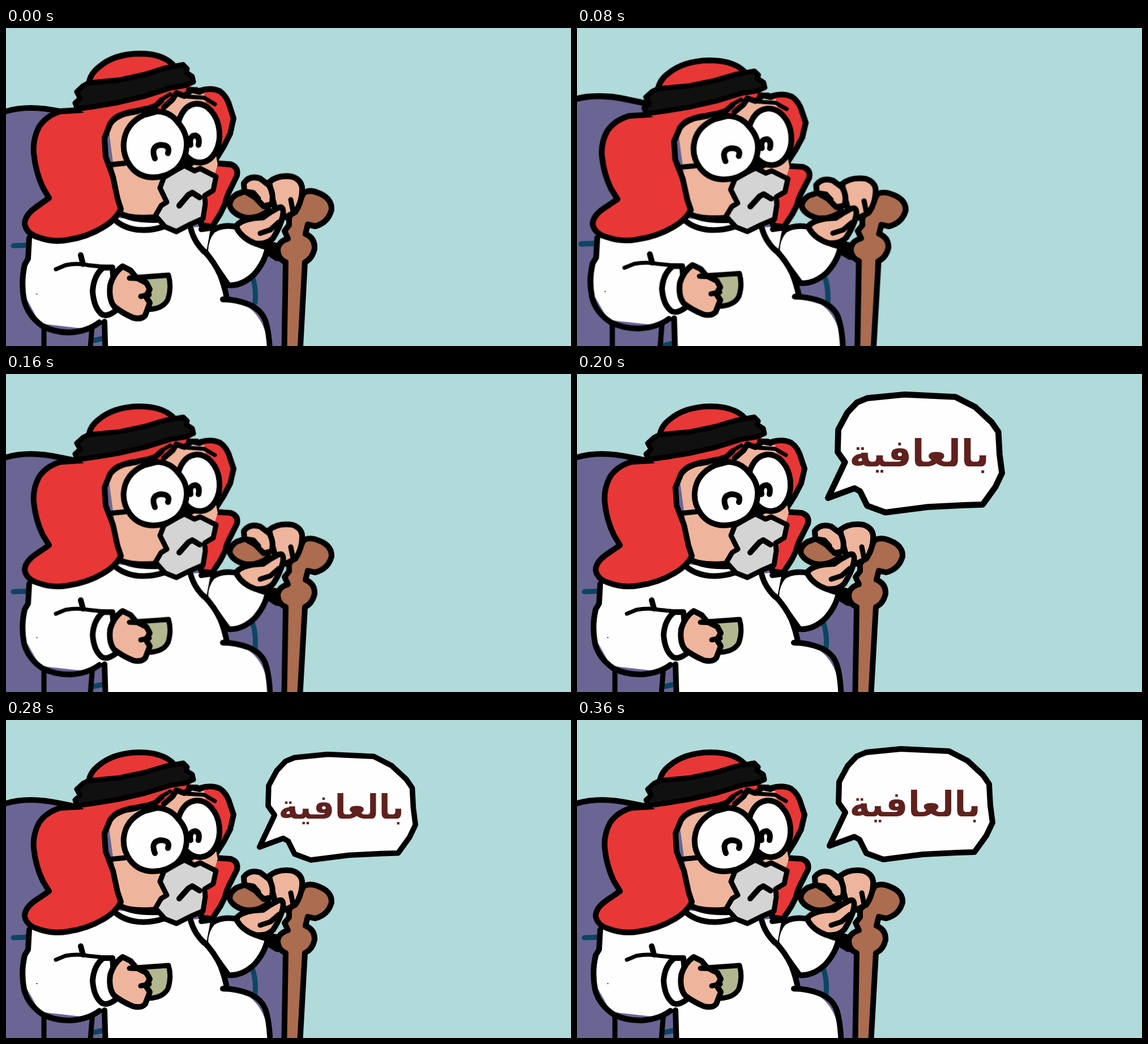
Recreate the animation shown at these times as an HTML page. Size 998 px wide and 561 px high, loop 1.94 s.

```html
<!DOCTYPE html>
<html lang="ar">
<head>
<meta charset="utf-8">
<title>Speech bubble cartoon</title>
<style>
html, body { margin: 0; width: 100%; height: 100%; overflow: hidden; background: #b1dada; }
svg { display: block; width: 998px; height: 561px; }
path, ellipse { stroke: #000; stroke-width: 10; stroke-linejoin: round; stroke-linecap: round; fill: none; }
.red { fill: #e83737; }
.skin { fill: #eeb59c; }
.white { fill: #fefefe; }
.brown { fill: #ab6c4f; }
.grey { fill: #d4d4d4; }
.cup { fill: #b2b790; }
.band { fill: #101010; }
.purple { fill: #6a6593; }
.teal { stroke: #0b4662; stroke-width: 9; }
.thin { stroke-width: 7; }
.mid { stroke-width: 9; }
.bare { stroke: none; }
.ink { fill: #000; }
text { font: bold 62px "DejaVu Sans", sans-serif; fill: #5f211e; direction: rtl; text-anchor: middle; }

#scene, #chair, #man, #bubble {
  transform-box: view-box;
  animation: 1940ms step-end infinite;
}
#scene { transform-origin: 300px 0; animation-name: widen; }
#chair { transform-origin: 0 424px; animation-name: rise; }
#man { transform-origin: 0 357px; animation-name: settle; }
#bubble { transform-origin: 485px 272px; animation-name: pop; }

@keyframes widen {
  0% { transform: none; }
  2.06% { transform: scaleX(1.01); }
  4.12% { transform: scaleX(1.02); }
  6.18% { transform: scaleX(1.01); }
  8.24%, 100% { transform: none; }
}
@keyframes rise {
  0% { transform: none; }
  2.06% { transform: scaleY(1.037); }
  4.12% { transform: scaleY(1.074); }
  6.18% { transform: scaleY(1.037); }
  8.24%, 100% { transform: none; }
}
@keyframes settle {
  0% { transform: scaleY(1.04); }
  2.06% { transform: scaleY(1.02); }
  4.12%, 100% { transform: none; }
}
@keyframes pop {
  0% { visibility: hidden; }
  10.3% { visibility: visible; transform: scale(1.067); }
  12.37% { visibility: visible; transform: scale(1.012); }
  14.43% { visibility: visible; transform: scale(.957); }
  16.49% { visibility: visible; transform: scale(.978); }
  18.55%, 100% { visibility: visible; transform: none; }
}
</style>
</head>
<body>
<svg viewBox="0 0 998 561">
  <g id="scene">
    <g id="chair">
      <path class="purple" d="M-20 151L0 147Q40 135 95 147L160 160L400 400L495 392V620H-20Z"/>
      <path class="teal" d="M13 384L42 383M436 441Q442 460 440 484M156 551L174 547"/>
      <path class="mid" d="M67 515V600M153 515L146 600"/>
    </g>

    <g id="man">
      <!-- scarf, far side -->
      <path class="red" d="M343 120Q362 114 378 121Q391 130 396 149L402 167L396 193L385 214L371 236L350 235Z"/>
      <path class="red" d="M368 243L397 245Q411 250 408 264L398 284Q389 300 387 312L379 328L364 351L345 348L340 290Z"/>

      <!-- robe -->
      <path class="white bare" d="M42 365L190 335L330 350L350 392Q375 415 388 474Q462 480 467 580H176L174 512L150 525L60 515L29 460L40 405Z"/>
      <path class="ink" d="M462 394L470 381L488 386L490 405L478 404Z" stroke-width="4"/>
      <path class="white" d="M352 393Q352 372 365 357Q382 346 408 351Q416 374 462 386Q458 410 438 432Q416 452 393 450Z"/>
      <path class="white bare" d="M325 352L362 350L354 393L383 450L340 410Z"/>
      <path d="M326 353Q332 376 350 393M345 355L359 353"/>
      <path d="M350 392Q368 410 379 434Q387 455 390 472M383 474Q407 474 430 483Q451 492 458 510Q466 532 467 580"/>
      <path d="M41 370L39 405L33 415Q26 445 32 476Q39 502 64 519Q87 531 115 530Q145 528 165 513M174 512L176 580"/>
      <path d="M191 338Q207 353 233 356Q258 358 280 350M203 326Q216 341 270 339" stroke-width="8"/>

      <!-- face -->
      <path class="skin bare" d="M180 175L215 150L300 128L350 125L374 245L345 338L240 338L200 325Z"/>
      <path d="M200 327Q218 339 272 334" stroke-width="9"/>
      <path class="red bare" d="M128 150L312 98L335 122L300 128L283 150L225 158L180 178Z"/>
      <path class="red" d="M130 153L96 155Q70 163 58 182Q47 203 49 226Q52 257 65 284L76 302L54 317Q33 331 33 346Q36 363 58 369Q82 378 110 373Q144 368 171 352Q193 340 203 321L197 303L189 266L176 232L174 200L184 176Q195 160 216 158L232 155L220 144Z"/>
      <path class="bare red" d="M124 149L240 128L242 150L200 157L160 170Z"/>
      <path class="mid" d="M181 246L211 243" stroke-width="6"/>
      <path d="M184 176Q198 158 228 155L247 151M252 150L264 146L275 136M279 148L294 135L301 124L315 129L328 119L342 122" stroke-width="8"/>
      <path class="thin" d="M319 130L350 132L369 143M273 136L290 126"/>

      <!-- glasses -->
      <path class="ink" d="M307 231L321 207L335 239L318 248Z"/>
      <ellipse class="white" cx="340" cy="192" rx="37" ry="50" transform="rotate(-6 340 192)" stroke-width="11"/>
      <path class="white" stroke-width="11" d="M244 161L267 155Q290 156 303 173Q321 192 319 215Q317 239 301 253Q281 268 258 267Q233 266 219 247Q206 229 208 208Q211 176 244 161Z"/>
      <path d="M263 235Q255 215 272 212Q291 212 286 226" stroke-width="9"/>
      <path d="M326 212Q323 196 335 196Q343 199 340 212" stroke-width="9"/>

      <!-- mask -->
      <path class="grey mid" d="M315 247L333 256L343 252L371 266L366 289L351 298L352 312L348 337L325 347L301 359L281 351L264 332L274 315L284 309L272 285L279 267L300 255Z"/>
      <path d="M306 315L322 297L329 293L342 301" stroke-width="8"/>

      <!-- headwear -->
      <path class="red" d="M146 108Q149 91 164 80Q190 58 235 57Q276 57 295 76L300 92L180 122Z"/>
      <path class="band mid" d="M136 112L146 107L200 102L243 93L280 82L313 76L320 83L318 89L329 96L331 105L317 111L291 115L246 129L198 140L155 147L126 151L122 141L131 133L125 122Z"/>
      <path d="M323 119L337 119" stroke-width="9"/>

      <!-- cane -->
      <path class="brown" d="M500 335L514 316L526 293Q537 287 553 294Q576 303 575 322Q569 344 546 350L533 347L529 363Q546 370 545 388Q541 405 528 411L518 590H491L494 411Q480 405 480 390Q481 376 498 371L492 358L500 348Z"/>
      <path class="brown" d="M424 290L407 296Q395 304 395 315Q400 329 421 335Q444 339 464 323L455 306Z"/>

      <!-- hand on the cane -->
      <path class="skin" d="M465 275Q481 262 506 266Q521 271 523 284Q524 307 511 326L493 335L478 330L470 300Z"/>
      <path class="skin" d="M420 277Q430 263 449 269L465 281Q474 297 469 313L455 316L440 301L421 290Z"/>
      <path class="skin" d="M408 348Q420 336 454 335Q466 326 480 319Q492 314 489 332Q485 350 472 370Q460 382 440 379Q418 371 408 354Z"/>
      <path class="mid" d="M449 362L467 356L482 343M503 305L507 325M424 291L437 293L446 303"/>

      <!-- near sleeve -->
      <path class="thin" d="M88 423L105 416Q126 412 145 416L184 420"/>
      <path d="M132 399L136 414" stroke-width="5"/>
      <circle cx="54.500" cy="465" r="1"/>
      <path class="white" d="M188 420L172 420Q155 433 153 460Q155 488 169 499Q178 505 194 493Z"/>

      <!-- cup and hand -->
      <path class="cup mid" d="M230 437L287 433Q293 453 286 474Q277 491 250 491Z"/>
      <path class="skin" d="M206 418L220 425L230 437L248 446L254 457L247 469L254 480L246 501Q239 509 224 505Q205 497 191 486Q181 474 184 450Q190 429 206 418Z"/>
      <path class="mid" d="M218 438L244 439M238 469L253 466"/>
    </g>
  </g>

  <g id="bubble">
    <path class="white" stroke-width="11" d="M494 64L511 57L572 51L657 55L690 72L717 97L728 113L730 150L734 181L723 204L702 233L672 234L611 237L541 246L511 235L499 211L490 206L446 222L474 163L462 146L463 109L478 81Z"/>
    <text x="597" y="170">بالعافية</text>
  </g>
</svg>
</body>
</html>
```
